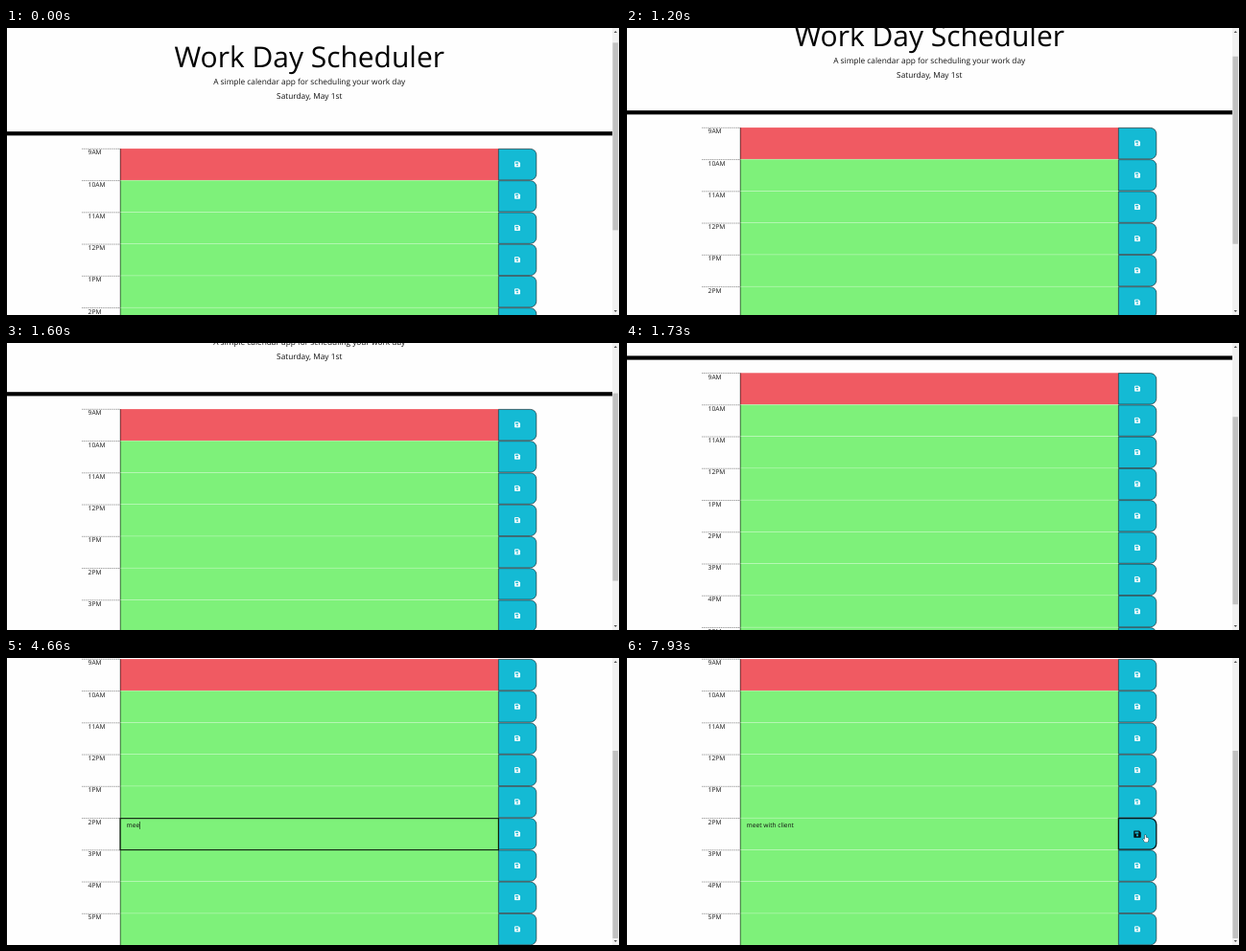
Write an HTML page with a canvas that moves like this. It is 640 by 300 pixels and loops after 8000 ms.

```html
<!DOCTYPE html>
<html lang="en">
<head>
<meta charset="utf-8">
<title>Work Day Scheduler</title>
<style>
  html, body { margin: 0; width: 100%; height: 100%; overflow: hidden; background: #fefefe; }
  canvas { display: block; width: 640px; height: 300px; }
</style>
</head>
<body>
<canvas id="stage"></canvas>
<script>
const W = 640, H = 300, LOOP = 8000, STEP = 1000 / 15;
const canvas = document.getElementById('stage');
const ctx = canvas.getContext('2d');
const ratio = window.devicePixelRatio || 1;
canvas.width = W * ratio;
canvas.height = H * ratio;

const HOURS = ['9AM', '10AM', '11AM', '12PM', '1PM', '2PM', '3PM', '4PM', '5PM'];
const ROW = 33.25, FIRST = 126.1, ACTIVE = 5;
const LEFT = 79, AREA = 119, BTN = 513.4, RIGHT = 552.8;
const COLOR = { page: '#fefefe', now: '#f05a62', later: '#7ef17a', save: '#14bad4' };

// Page scroll over time: [ms, px]
const SCROLL = [[1000, 0], [1065, 4], [1200, 22], [1330, 36], [1465, 44],
                [1600, 57], [1730, 94], [1860, 125]];
const POINTER = [[6730, 440, 178], [7130, 500, 182], [7330, 532, 186], [7530, 541.3, 185]];

// Typing: the moment each letter appears
const NOTE = 'meet with client';
const KEYS = [4400, 4460, 4660, 4860, 5000, 5060, 5130, 5260,
              5400, 5460, 5530, 5730, 5930, 6060, 6130, 6260];
const FOCUS = 2730, BLINK = 533, HOVER = 7200, CLICK = 7660;

function track(points, t, col = 1) {
  if (t <= points[0][0]) return points[0][col];
  for (let i = 1; i < points.length; i++) {
    const a = points[i - 1], b = points[i];
    if (t < b[0]) return a[col] + (b[col] - a[col]) * (t - a[0]) / (b[0] - a[0]);
  }
  return points[points.length - 1][col];
}

function box(x, y, w, h, color) {
  ctx.fillStyle = color;
  ctx.fillRect(x, y, w, h);
}

function text(str, x, y, size, align = 'left', color = '#111') {
  ctx.font = `${size}px "Open Sans", "Noto Sans", sans-serif`;
  ctx.textAlign = align;
  ctx.fillStyle = color;
  ctx.fillText(str, x, y);
}

function shape(points, fill, stroke, width) {
  ctx.beginPath();
  points.forEach(([x, y], i) => i ? ctx.lineTo(x, y) : ctx.moveTo(x, y));
  ctx.closePath();
  if (stroke) {
    ctx.strokeStyle = stroke;
    ctx.lineWidth = width;
    ctx.stroke();
  }
  ctx.fillStyle = fill;
  ctx.fill();
}

// Rectangle with rounded right corners
function tab(x, y, w, h, r) {
  ctx.beginPath();
  ctx.moveTo(x, y);
  ctx.arcTo(x + w, y, x + w, y + h, r);
  ctx.arcTo(x + w, y + h, x, y + h, r);
  ctx.lineTo(x, y + h);
  ctx.closePath();
}

function disk(cx, cy, size, color, hole) {
  ctx.save();
  ctx.translate(cx, cy);
  ctx.scale(size, size);
  ctx.lineJoin = 'round';
  shape([[-.43, -.43], [.22, -.43], [.43, -.22], [.43, .43], [-.43, .43]], color, color, .14);
  box(-.34, -.34, .52, .25, hole);
  ctx.beginPath();
  ctx.arc(0, .18, .15, 0, Math.PI * 2);
  ctx.fill();
  ctx.restore();
}

function hand(x, y) {
  ctx.save();
  ctx.translate(x, y);
  ctx.lineJoin = 'round';
  shape([[-.6, 0], [.5, 0], [.6, 2.6], [3.2, 3.3], [3.3, 5.2], [2.5, 7.4],
         [-.5, 7.4], [-2.3, 4.6], [-1.8, 3.9], [-.6, 4.8]], '#fff', '#17343a', 1);
  ctx.restore();
}

function header(top) {
  text('Work Day Scheduler', 316.2, top + 41.4, 29.95, 'center', '#000');
  text('A simple calendar app for scheduling your work day', 316.2, top + 58.8, 8.31, 'center');
  text('Saturday, May 1st', 316.2, top + 73.7, 8.31, 'center');
  box(0, top + 108.2, 632, 4.2, '#000');
}

function saveButton(y, hover, focus) {
  tab(BTN, y + .3, RIGHT - BTN, ROW - .8, 6.2);
  ctx.fillStyle = COLOR.save;
  ctx.fill();
  ctx.strokeStyle = focus ? '#06181c' : 'rgba(12,32,38,.85)';
  ctx.lineWidth = focus ? 1.3 : .75;
  ctx.stroke();
  disk(533, y + (hover ? 16.8 : 16.3), hover ? 7.4 : 5.9, hover ? '#081417' : '#fff', COLOR.save);
}

function row(i, y, t) {
  const active = i === ACTIVE;
  ctx.strokeStyle = '#555';
  ctx.lineWidth = .55;
  ctx.setLineDash([1.2, .6]);
  ctx.beginPath();
  ctx.moveTo(LEFT, y + .2);
  ctx.lineTo(AREA, y + .2);
  ctx.stroke();
  ctx.setLineDash([]);

  text(HOURS[i], 85.6, y + 6.3, 6.65);
  box(AREA, y, BTN - AREA, ROW, i ? COLOR.later : COLOR.now);
  box(AREA, y + ROW - .4, BTN - AREA, .75, 'rgba(255,255,255,.7)');
  box(AREA - .2, y, .7, ROW, 'rgba(0,0,0,.8)');
  saveButton(y, active && t >= HOVER, active && t >= CLICK);
}

function note(y, t) {
  const count = KEYS.filter(k => t >= k).length;
  const typed = NOTE.slice(0, count);
  text(typed, 125.6, y + 9.8, 6.65);
  if (t < FOCUS || t >= CLICK) return;

  ctx.strokeStyle = '#0b1c0b';
  ctx.lineWidth = 1.1;
  ctx.strokeRect(AREA, y + .3, BTN - AREA, ROW - .3);
  const since = t - (count ? KEYS[count - 1] : FOCUS);
  if (Math.floor(since / BLINK) % 2 === 0) {
    box(125.6 + ctx.measureText(typed).width, y + 3.6, .55, 8, '#000');
  }
}

function scrollbar(scroll) {
  box(632, 0, 7, H, '#f1f1f1');
  box(632.4, 7 + (scroll + 12.8) * .653, 5.6, 196, '#c1c1c1');
  shape([[633.6, 5], [635.3, 3], [637, 5]], '#505050');
  shape([[633.6, 295], [635.3, 297], [637, 295]], '#505050');
}

function draw(t) {
  const tick = Math.floor((t + 7) / STEP) * STEP;
  const scroll = track(SCROLL, tick);
  ctx.setTransform(ratio, 0, 0, ratio, 0, 0);
  ctx.textRendering = 'geometricPrecision';
  box(0, 0, W, H, COLOR.page);

  header(-scroll);
  const top = FIRST - scroll;
  HOURS.forEach((_, i) => row(i, top + i * ROW, t));
  note(top + ACTIVE * ROW, t);

  scrollbar(scroll);
  box(0, 0, 1, H, '#000');
  box(639, 0, 1, H, '#000');
  if (t >= HOVER) hand(track(POINTER, tick, 1), track(POINTER, tick, 2));
}

const start = performance.now();
function loop() {
  draw((performance.now() - start) % LOOP);
  requestAnimationFrame(loop);
}
loop();
</script>
</body>
</html>
```
